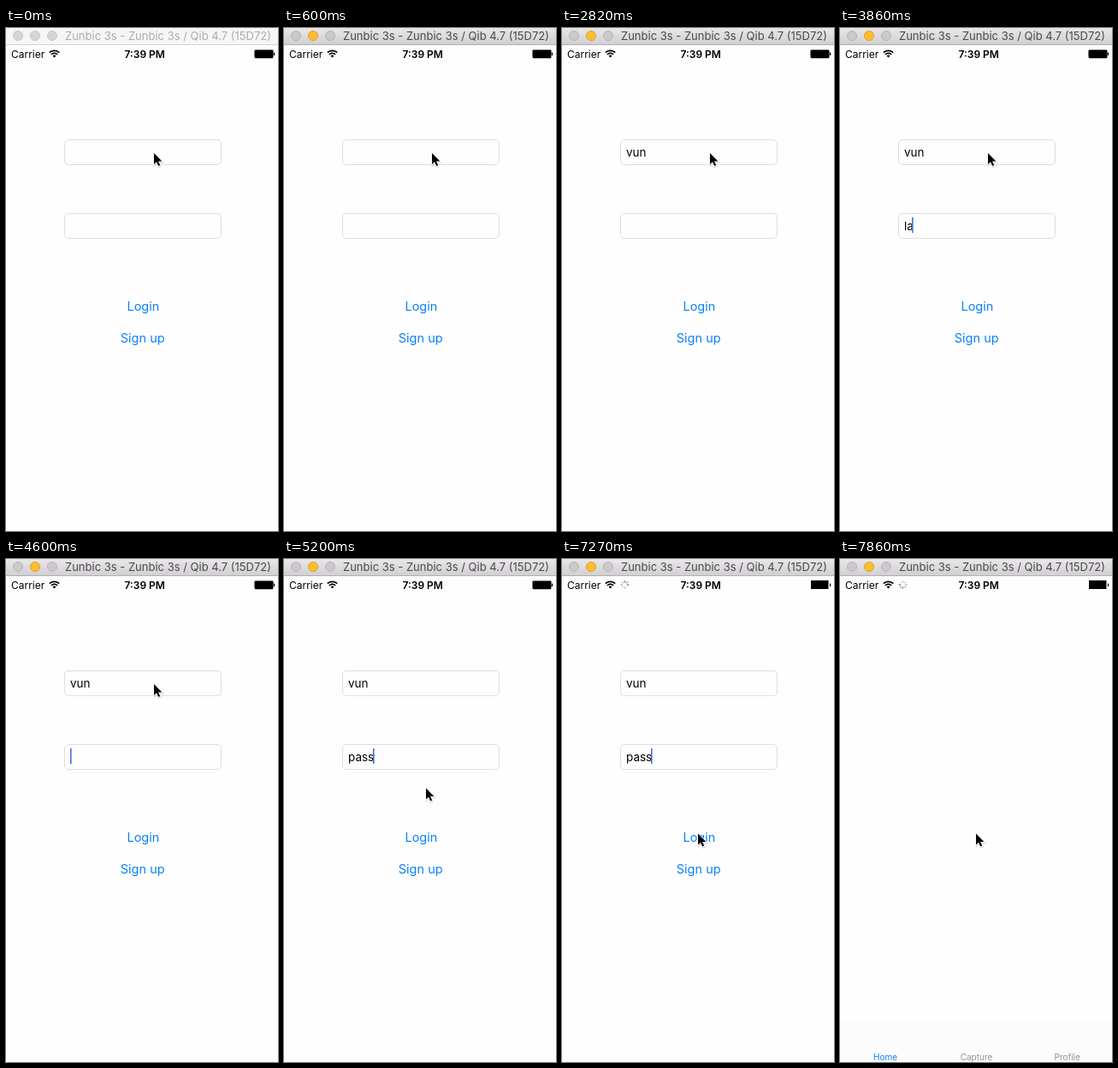
Recreate the animation shown at these times as an HTML page. Size 318 px wide and 587 px high, loop 8000 ms.

```html
<!DOCTYPE html>
<html lang="en">
<head>
<meta charset="utf-8">
<title>Login</title>
<style>
  html, body { margin: 0; width: 100%; height: 100%; overflow: hidden; background: #fefefe; }
  svg { display: block; width: 318px; height: 587px; font-family: Inter, "Liberation Sans", sans-serif; }
  .mid { text-anchor: middle; }
  .field { fill: #fdfdfd; stroke: #dedede; }
  .entry { font-size: 13.5px; }
  .link { font-size: 14.5px; fill: #0a80fa; }
  .tab { font-size: 10px; fill: #929292; }
</style>
</head>
<body>
<svg viewBox="0 0 318 587">
  <defs>
    <linearGradient id="chrome" x2="0" y2="1">
      <stop stop-color="#e9e7e9"/>
      <stop offset="1" stop-color="#d0ced0"/>
    </linearGradient>
  </defs>
  <rect width="318" height="587" fill="#fefefe"/>

  <g id="form">
    <rect class="field" x="68.5" y="130.5" width="183" height="29" rx="4.5"/>
    <rect class="field" x="68.5" y="216.5" width="183" height="29" rx="4.5"/>
    <text class="entry" id="user" x="75" y="150"/>
    <text class="entry" id="pass" x="75" y="236"/>
    <rect id="caret" width="1.6" height="18" fill="#426fd9"/>
    <text class="link mid" id="login" x="160.4" y="329.5">Login</text>
    <text class="link mid" x="159.7" y="367.3">Sign up</text>
  </g>

  <g id="home">
    <rect width="318" height="568" y="20" fill="#fefefe"/>
    <rect width="318" height="48" y="539" fill="#fcfcfc"/>
    <text class="tab mid" x="53" y="584.5" style="fill:#0a80fa">Home</text>
    <text class="tab mid" x="159.5" y="584.5">Capture</text>
    <text class="tab mid" x="265.7" y="584.5">Profile</text>
  </g>

  <g id="status">
    <rect width="318" height="20" y="20" fill="#fefefe"/>
    <text x="6" y="34.5" font-size="12">Carrier</text>
    <g fill="none" stroke="#000" stroke-width="1.7">
      <path d="M50.8 28.7a8 8 0 0 1 11.4 0M52.9 31a5 5 0 0 1 7.2 0"/>
      <path d="M54.6 32.6a2.6 2.6 0 0 1 3.8 0L56.5 34.6z" fill="#000" stroke="none"/>
    </g>
    <g id="spinner" stroke="#333" stroke-width=".9"/>
    <text class="mid" x="162.2" y="34.5" font-size="12" font-weight="600">7:39 PM</text>
    <rect id="shell" x="290.5" y="25.5" width="22" height="9.5" rx="1.5" fill="none" stroke="#777"/>
    <rect id="charge" x="291"/>
    <rect x="313" y="28.5" width="1.2" height="3.5" rx=".6"/>
  </g>

  <g id="bar">
    <rect id="barFill" width="318" height="20"/>
    <rect id="barEdge" width="318" height="1" y="19"/>
    <g id="lights"></g>
    <text id="caption" x="69" y="14" font-size="13">Zunbic 3s - Zunbic 3s / Qib 4.7 (15D72)</text>
  </g>

  <g id="pointer">
    <path d="M0 0V13L3 10.2 5.2 15 7.2 14.1 5 9.5H9.4Z" transform="translate(.6 1.3)"
          fill="#000" stroke="#000" stroke-width="2" opacity=".13"/>
    <path d="M0 0V13L3 10.2 5.2 15 7.2 14.1 5 9.5H9.4Z" stroke="#fff" stroke-width="1.4" paint-order="stroke"/>
  </g>
</svg>
<script>
const LOOP = 8000, TICK = 147.7, SETTLED = 7860;
const $ = id => document.getElementById(id);
const set = (el, attrs) => { for (const k in attrs) el.setAttribute(k, attrs[k]); };
const clamp = v => Math.min(1, Math.max(0, v));
const add = (parent, tag, attrs) => {
  const el = document.createElementNS("http://www.w3.org/2000/svg", tag);
  set(el, attrs);
  return parent.appendChild(el);
};

const lights = [14, 34, 54].map(cx => add($("lights"), "circle", { cx, cy: 9, r: 5.5 }));
const SPOKES = 8;
const spokes = Array.from({ length: SPOKES }, (_, i) =>
  add($("spinner"), "path", { d: "M0-2.4V-4.8", transform: `translate(73.5 30) rotate(${i * 360 / SPOKES})` }));

// time, user name, password, focused field, caret opacity
const typing = [
  [0, "", "", 0, 0],
  [1050, "", "", 0, 1],
  [1490, "", "", 0, .5],
  [1640, "", "", 0, 0],
  [1780, "v", "", 0, 1],
  [1930, "vu", "", 0, 1],
  [2070, "vun", "", 1, 1],
  [2670, "vun", "", 1, .5],
  [2820, "vun", "", 1, 0],
  [3420, "vun", "", 1, 1],
  [3720, "vun", "l", 1, 1],
  [3860, "vun", "la", 1, 1],
  [4310, "vun", "l", 1, 1],
  [4460, "vun", "", 1, 1],
  [4610, "vun", "p", 1, 1],
  [4750, "vun", "pa", 1, 1],
  [4900, "vun", "pass", 1, 1],
  [5490, "vun", "pass", 1, .5],
  [5640, "vun", "pass", 1, 0],
  [6230, "vun", "pass", 1, 1],
  [6830, "vun", "pass", 1, .5],
  [6980, "vun", "pass", 1, 0],
  [7270, "vun", "pass", 1, 1]
];

// time, x, y of the pointer tip
const path = [
  [0, 173, 146],
  [5050, 171, 176],
  [5200, 166, 267.5],
  [5340, 161, 296],
  [5490, 159.5, 314],
  [5640, 159, 320.5]
];

const at = (list, t) => list.findLast(row => row[0] <= t);

// The screen refreshes in even ticks
const snap = t => SETTLED - Math.max(0, Math.ceil((SETTLED - t - 12) / TICK)) * TICK;

function drawBar(active) {
  set($("barFill"), { fill: active ? "url(#chrome)" : "#f6f6f6" });
  set($("barEdge"), { fill: active ? "#b3b1b3" : "#d4d4d4" });
  set($("caption"), { fill: active ? "#4a494a" : "#acacac" });
  lights.forEach((light, i) => {
    const lit = active && i === 1;
    set(light, {
      fill: lit ? "#fdbd2f" : active ? "#cbc9cb" : "#d5d5d5",
      stroke: lit ? "#dfa12a" : active ? "#b5b3b5" : "#c6c6c6"
    });
  });
}

function drawForm(t, tick) {
  const [, user, pass, field, opacity] = at(typing, t);
  $("user").textContent = user;
  $("pass").textContent = pass;
  const text = field ? pass : user;
  const width = text ? $(field ? "pass" : "user").getComputedTextLength() - 1 : 0;
  set($("caret"), { x: Math.floor(75 + width), y: field ? 221 : 135, opacity });
  const fade = tick < 5780 ? 1 : clamp(.3 + .35 * (tick - 5792) / TICK);
  set($("login"), { opacity: fade });
}

function drawStatus(t, tick) {
  const busy = t >= 5940;
  set($("spinner"), { visibility: busy ? "visible" : "hidden" });
  set($("shell"), { visibility: busy ? "hidden" : "visible" });
  set($("charge"), busy ? { y: 25, width: 20.5, height: 10 } : { y: 26, width: 21, height: 9 });
  const head = Math.floor(tick / 1000 * SPOKES);
  spokes.forEach((spoke, i) => {
    const age = (((head - i) % SPOKES) + SPOKES) % SPOKES;
    set(spoke, { opacity: 1 - age * .1 });
  });
}

function draw() {
  const t = performance.now() % LOOP, tick = snap(t);
  drawBar(t >= 600);
  drawForm(t, tick);
  drawStatus(t, tick);
  const rise = clamp((tick - 7350) / 510);
  set($("home"), { transform: `translate(0 ${567 * (1 - rise) ** 3})` });
  const [, x, y] = at(path, t);
  set($("pointer"), { transform: `translate(${x} ${y})` });
  requestAnimationFrame(draw);
}
draw();
</script>
</body>
</html>
```
